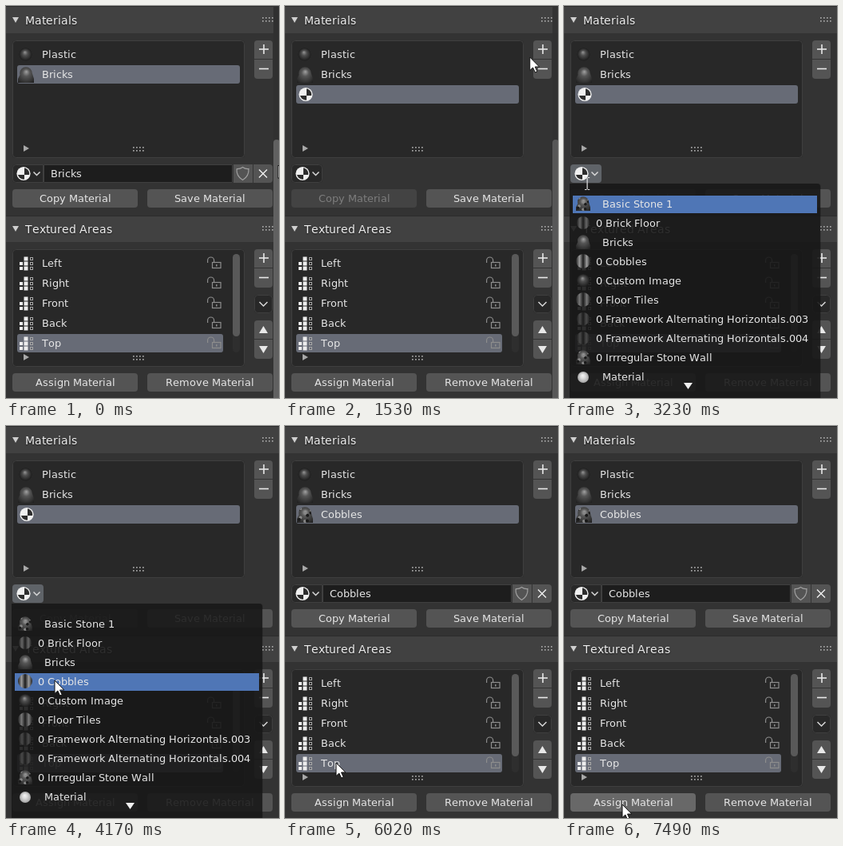
Write an HTML page with a canvas that moves like this. It is 342 px wide and 490 px high and loops after 8420 ms.

```html
<!DOCTYPE html>
<html lang="en">
<head>
<meta charset="utf-8">
<title>Material slots</title>
<style>
html, body { margin: 0; width: 100%; height: 100%; overflow: hidden; background: #333; }
canvas { display: block; width: 342px; height: 490px; }
</style>
</head>
<body>
<canvas id="stage"></canvas>
<script>
const W = 342, H = 490, LOOP = 8420;
const canvas = document.getElementById('stage');
const c = canvas.getContext('2d');
const dpr = window.devicePixelRatio || 1;
canvas.width = W * dpr;
canvas.height = H * dpr;

const FONT = '"DejaVu Sans", sans-serif';
const BTN = '#545454', DARK = '#282828', EDGE = '#3f3f3f', SELECT = '#676b76', BLUE = '#4f76b6';

// start, end, number of steps, target x, target y, sideways bow
const moves = [
  [70, 460, 6, 325, 58, 0],
  [920, 1000, 2, 324, 55, 0],
  [1530, 2300, 11, 22, 213, 0],
  [3230, 3230, 1, 29, 222, 0],
  [3310, 3850, 8, 60, 311, 0],
  [4170, 4170, 1, 61, 318, 0],
  [5330, 6020, 10, 64, 421, 5],
  [6340, 6800, 7, 74, 472, 0],
  [7110, 7110, 1, 73, 473, 0]
];

const clamp = v => Math.max(0, Math.min(1, v));
let mouse = { x: 341, y: 199 }, menuOpen = false;

function cursorAt(t) {
  let x = 341, y = 199;
  for (const [t0, t1, n, tx, ty, bow] of moves) {
    if (t < t0) break;
    const step = t >= t1 ? n : Math.floor((t - t0) / (t1 - t0) * (n - 1) + 1e-6) + 1;
    const p = step / n, e = (p + p * p * (3 - 2 * p)) / 2;
    x += (tx - x) * e + bow * 4 * e * (1 - e);
    y += (ty - y) * e;
    if (step < n) break;
  }
  return { x, y };
}

function box(x, y, w, h, fill, r = 3, edge) {
  c.beginPath();
  c.roundRect(x, y, w, h, r);
  c.fillStyle = fill;
  c.fill();
  if (edge) {
    c.beginPath();
    c.roundRect(x + .5, y + .5, w - 1, h - 1, r);
    c.strokeStyle = edge;
    c.lineWidth = 1;
    c.stroke();
  }
}

// Each glyph advances by whole pixels, as in the interface toolkit.
function text(s, x, y, color = '#e6e6e6', size = 12.9, centered = false) {
  c.font = size + 'px ' + FONT;
  c.fillStyle = color;
  const steps = [...s].map(ch => Math.round(c.measureText(ch).width));
  if (centered) x = Math.round(x - steps.reduce((a, b) => a + b, 0) / 2);
  steps.forEach((step, i) => {
    c.fillText(s[i], x, y);
    x += step;
  });
}

function poly(points, fill, stroke, width = 1) {
  c.beginPath();
  points.forEach(([x, y]) => c.lineTo(x, y));
  if (fill) {
    c.closePath();
    c.fillStyle = fill;
    c.fill();
  }
  if (stroke) {
    c.strokeStyle = stroke;
    c.lineWidth = width;
    c.stroke();
  }
}

function disc(x, y, r, fill) {
  c.beginPath();
  c.arc(x, y, r, 0, 7);
  c.fillStyle = fill;
  c.fill();
}

function hovered(x, y, w, h) {
  return !menuOpen && mouse.x >= x && mouse.x < x + w && mouse.y >= y && mouse.y < y + h;
}

function button(x, y, w, h, { label, off, down, r = 4 } = {}) {
  const fill = down ? '#5079bd' : off ? '#434343' : hovered(x, y, w, h) ? '#686868' : BTN;
  box(x, y, w, h, fill, r);
  if (label) text(label, x + w / 2, y + 16, off ? '#7d7d7d' : '#e6e6e6', 12.9, true);
}

function plusMinus(y, down) {
  button(311, y, 23, 23, { down, r: [4, 4, 0, 0] });
  button(311, y + 24, 23, 24, { r: [0, 0, 4, 4] });
  c.fillStyle = '#e8e8e8';
  c.fillRect(317, y + 10.2, 12, 1.6);
  c.fillRect(322.2, y + 5, 1.6, 12);
  c.fillRect(317, y + 34.7, 12, 1.6);
}

function grip(x, y) {
  c.fillStyle = '#a4a4a4';
  for (let i = 0; i < 8; i++) c.fillRect(x + i % 4 * 4, y + (i > 3 ? 4 : 0), 1.7, 1.7);
}

function header(title, y, h) {
  const bottom = y + h;
  c.fillStyle = '#2b2b2b';
  c.fillRect(0, y - 1, W, 1);
  c.fillStyle = '#414141';
  c.fillRect(0, y, W, h);
  poly([[8, bottom - 20], [16, bottom - 20], [12, bottom - 13]], '#cfcfcf');
  c.shadowColor = 'rgba(0,0,0,.6)';
  c.shadowOffsetY = dpr;
  c.shadowBlur = 2 * dpr;
  text(title, 24, bottom - 11, '#eee', 14);
  c.shadowColor = 'transparent';
  grip(321, bottom - 20);
}

function listBox(y) {
  box(8, y, 291, 147, DARK, 4, EDGE);
  poly([[22, y + 131], [29, y + 135], [22, y + 139]], '#a8a8a8');
  grip(159, y + 133);
}

function checkerIcon(x, y) {
  disc(x, y, 8.6, '#f0f0f0');
  c.save();
  c.beginPath();
  c.arc(x, y, 7.2, 0, 7);
  c.clip();
  c.fillStyle = '#2d2d2d';
  c.fillRect(x + 1, y - 8, 8, 9.5);
  c.fillRect(x - 8, y + 1.5, 9, 8);
  c.restore();
}

function ball(x, y, r, tone = 150) {
  const g = c.createRadialGradient(x - r * .1, y - r * .35, 0, x, y, r);
  g.addColorStop(0, `rgb(${tone},${tone},${tone})`);
  g.addColorStop(.4, tone > 200 ? '#ddd' : '#4e4e4e');
  g.addColorStop(1, tone > 200 ? '#a5a5a5' : '#1d1d1d');
  disc(x, y, r, g);
}

function stripedBall(x, y, r, tone) {
  const g = c.createLinearGradient(x - r, 0, x + r, 0);
  ['#222', tone, '#1b1b1b', tone, '#222'].forEach((color, i) => g.addColorStop(i / 4, color));
  disc(x, y, r, g);
}

// Preview of a material: a bell shape, optionally with a rocky surface.
function bell(x, y, s, rough) {
  c.save();
  c.beginPath();
  c.moveTo(x - s, y + s);
  c.lineTo(x - s, y + s * .5);
  c.lineTo(x - s * .75, y);
  c.arc(x, y - s * .2, s * .78, Math.PI, 0);
  c.lineTo(x + s, y + s * .5);
  c.lineTo(x + s, y + s);
  c.clip();
  const g = c.createRadialGradient(x + s * .05, y - s * .4, 0, x, y, s * 1.3);
  g.addColorStop(0, '#a2a2a2');
  g.addColorStop(.35, '#565656');
  g.addColorStop(1, '#222');
  c.fillStyle = g;
  c.fillRect(x - s, y - s, s * 2, s * 2);
  if (rough) {
    for (let i = 0; i < 10; i++) {
      const dx = Math.sin(i * 5.1) * s * .8, dy = Math.cos(i * 3.7) * s * .8;
      disc(x + dx, y + dy, s * .2, i % 2 ? '#1a1a1a' : '#888');
    }
  }
  c.restore();
}

const menuItems = [
  ['Basic Stone 1', y => bell(24, y, 9, true)],
  ['0 Brick Floor', y => stripedBall(24, y, 8, '#666')],
  ['Bricks', y => bell(24, y, 9)],
  ['0 Cobbles', y => stripedBall(24, y, 9, '#9a9a9a')],
  ['0 Custom Image', y => ball(24, y, 8)],
  ['0 Floor Tiles', y => stripedBall(24, y, 9, '#777')],
  ['0 Framework Alternating Horizontals.003', y => stripedBall(24, y, 8, '#4a4a4a')],
  ['0 Framework Alternating Horizontals.004', y => stripedBall(24, y, 8, '#4a4a4a')],
  ['0 Irrregular Stone Wall', y => bell(24, y, 9, true)],
  ['Material', y => ball(24, y + 1, 7, 245)]
];

function areaIcon(x, y) {
  c.fillStyle = '#ededed';
  c.strokeStyle = '#a5a5a5';
  c.lineWidth = 1;
  for (let row = 0; row < 3; row++) {
    const top = y - 8 + row * 6;
    if (row) c.fillRect(x, top, 4, 4);
    c.fillRect(x + 5.5, top - .5, 5, 5);
    c.strokeRect(x + 13.5, top + .5, 3, 3);
  }
}

function lockIcon(x, y) {
  c.strokeStyle = '#8d8d8d';
  c.lineWidth = 1.2;
  c.strokeRect(x + 6.5, y - .5, 10.5, 7);
  c.beginPath();
  c.moveTo(x + .6, y);
  c.lineTo(x + .6, y - 3);
  c.arc(x + 4.6, y - 3, 4, Math.PI, 0);
  c.lineTo(x + 8.6, y);
  c.stroke();
  c.fillStyle = '#8d8d8d';
  c.fillRect(x + 11, y + 2, 1.5, 2.5);
}

function chevron(x, y, s) {
  poly([[x - s, y - s / 2], [x, y + s / 2], [x + s, y - s / 2]], null, '#d8d8d8', 1.5);
}

function materialField(name) {
  const open = menuOpen, over = hovered(8, 198, 38, 23);
  box(8, 198, 39, 23, open ? '#5f6368' : over ? '#333' : DARK, name ? [4, 0, 0, 4] : 4, open ? null : EDGE);
  checkerIcon(22, 209.5);
  chevron(38.5, 209.5, 4);
  if (!name) return;
  box(47, 198, 237, 23, '#1d1d1d', 0, EDGE);
  text(name, 56, 214);
  box(285, 198, 24, 23, BTN, 0);
  box(310, 198, 24, 23, BTN, [0, 4, 4, 0]);
  c.beginPath();
  c.moveTo(289, 203.5);
  c.quadraticCurveTo(293, 204, 296.5, 201.5);
  c.quadraticCurveTo(300, 204, 304, 203.5);
  c.quadraticCurveTo(304.5, 213, 296.5, 217.5);
  c.quadraticCurveTo(288.5, 213, 289, 203.5);
  c.strokeStyle = '#a0a0a0';
  c.lineWidth = 1.2;
  c.stroke();
  poly([[317, 204.5], [327, 214.5]], null, '#eee', 1.4);
  poly([[327, 204.5], [317, 214.5]], null, '#eee', 1.4);
}

function materials(t) {
  const added = t >= 1150, chosen = t >= 4320;
  const name = chosen ? 'Cobbles' : added ? '' : 'Bricks';
  header('Materials', 1, 33);
  listBox(43);
  box(14, added ? 99 : 74, 279, 23, SELECT);
  ball(24.5, 60.5, 8);
  bell(25, 86, 10);
  text('Plastic', 45, 65);
  text('Bricks', 45, 90);
  if (chosen) {
    bell(25, 111, 10, true);
    text('Cobbles', 45, 115);
  } else if (added) checkerIcon(26, 110.5);
  plusMinus(43, t >= 920 && t < 1150);
  materialField(name);
  button(8, 229, 157, 23, { label: 'Copy Material', off: !name });
  button(177, 229, 157, 23, { label: 'Save Material' });
}

function areas(t) {
  header('Textured Areas', 263, 32);
  listBox(304);
  box(14, 410, 258, 23, SELECT);
  ['Left', 'Right', 'Front', 'Back', 'Top'].forEach((name, i) => {
    const y = 321 + i * 25;
    areaIcon(17, y + 1);
    text(name, 45, y + 5);
    lockIcon(252, y);
  });
  box(284, 310, 9, 123, '#2e2e2e', 4.5);
  box(284, 310, 9, 103, '#595959', 4.5);
  plusMinus(304);
  box(311, 361, 23, 23, DARK, 4, EDGE);
  chevron(322.5, 372.5, 5);
  button(311, 393, 23, 23, { r: [4, 4, 0, 0] });
  button(311, 417, 23, 24, { r: [0, 0, 4, 4] });
  poly([[317, 409], [322.5, 400], [328, 409]], '#e8e8e8');
  poly([[317, 425], [322.5, 434], [328, 425]], '#e8e8e8');
  button(8, 459, 157, 23, { label: 'Assign Material', down: t >= 7340 && t < 7490 });
  button(177, 459, 157, 23, { label: 'Remove Material' });
}

function scrollbar() {
  c.globalAlpha = clamp(1 - (318 - mouse.x) / 60);
  c.fillStyle = '#303030';
  c.fillRect(335, 0, 7, H);
  box(335, 167, 8, 340, '#616161', 4);
  c.globalAlpha = 1;
}

function menu() {
  box(7, 222, 315, 280, 'rgba(0,0,0,.15)', 4);
  box(7, 222, 314, 280, 'rgba(24,24,24,.88)', [0, 4, 0, 0]);
  const active = Math.max(0, Math.floor((mouse.y - 236) / 24));
  menuItems.forEach(([label, icon], i) => {
    const y = 247 + i * 24;
    if (i === active) box(11, y - 10, 306, 22, BLUE, 0);
    icon(y);
    text(label, label[0] === '0' ? 40 : 48, y + 5);
  });
  poly([[150, 471], [161, 471], [155.5, 479]], '#f0f0f0');
}

function pointer() {
  c.save();
  c.translate(mouse.x, mouse.y);
  if (menuOpen && mouse.y < 236) {
    c.fillStyle = '#e4e4e4';
    c.fillRect(-.5, -7, 1.2, 14);
    for (const y of [-8, 7]) {
      c.fillRect(-3, y, 2.5, 1);
      c.fillRect(.7, y, 2.5, 1);
    }
  } else {
    c.lineJoin = 'round';
    poly([[0, 0], [0, 16.5], [3.8, 13], [6.6, 19], [9.2, 17.8], [6.5, 12], [11.8, 12], [0, 0]],
      '#fff', '#111', 1);
  }
  c.restore();
}

function draw(t) {
  mouse = cursorAt(t);
  menuOpen = t >= 2470 && t < 4320;
  c.setTransform(dpr, 0, 0, dpr, 0, 0);
  c.fillStyle = '#333';
  c.fillRect(0, 0, W, H);
  materials(t);
  areas(t);
  scrollbar();
  if (menuOpen) menu();
  pointer();
}

const start = performance.now();
function tick() {
  draw((performance.now() - start) % LOOP);
  requestAnimationFrame(tick);
}
tick();
</script>
</body>
</html>
```
